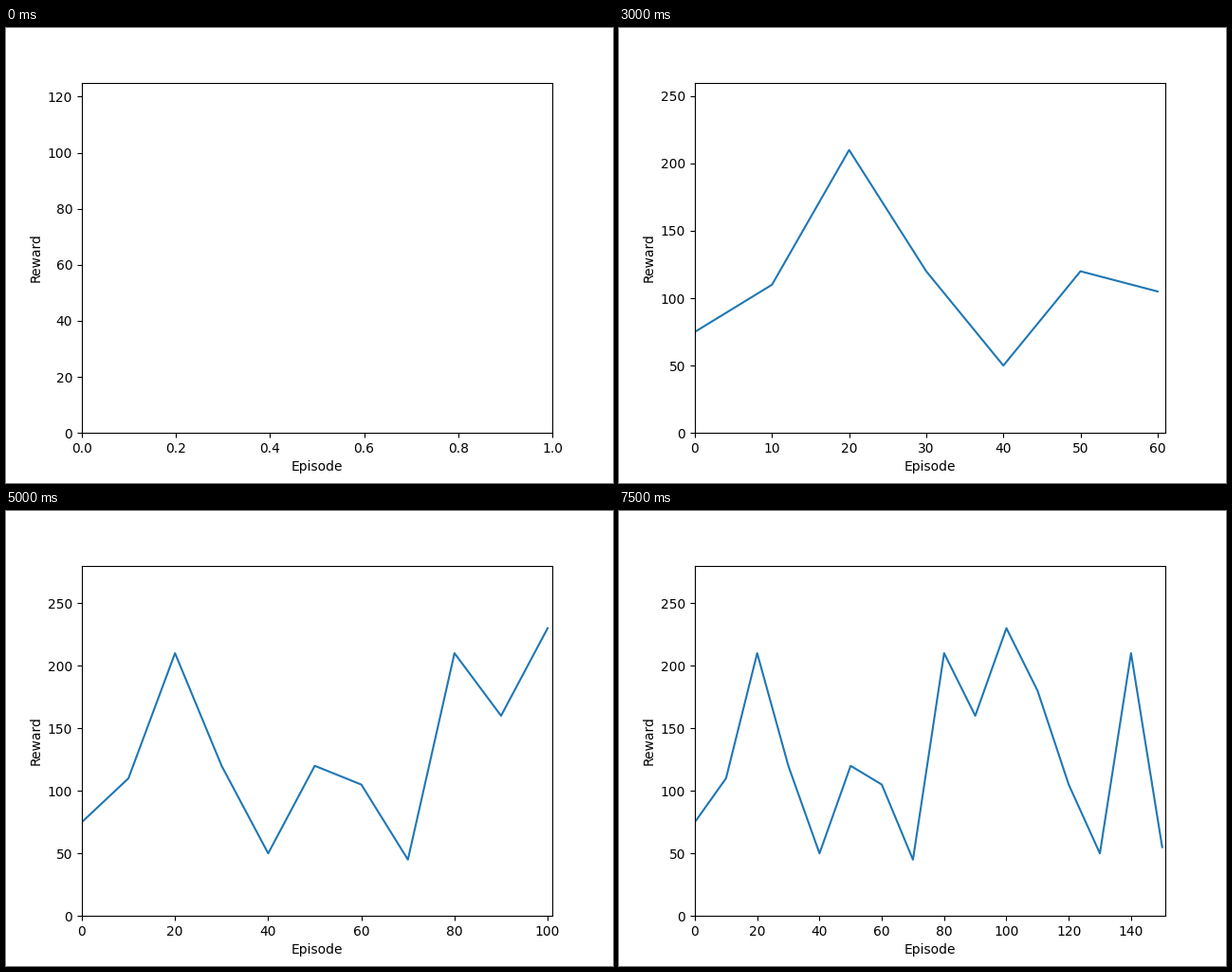
A matplotlib script that plays this animation: 640x480 px, repeating every 8000 ms.

```python
import matplotlib.pyplot as plt
from matplotlib.animation import FuncAnimation

STEP = 10        # episodes between evaluations
HEADROOM = 50    # space kept above the best reward
REWARDS = [75, 110, 210, 120, 50, 120, 105, 45,
           210, 160, 230, 180, 105, 50, 210, 55]
EPISODES = [STEP * i for i in range(len(REWARDS))]

fig, ax = plt.subplots(figsize=(6.4, 4.8), dpi=100)
ax.set_xlabel("Episode")
ax.set_ylabel("Reward")
line, = ax.plot([], [], color="tab:blue", lw=1.5)


def update(i):
    episodes, rewards = EPISODES[:i + 1], REWARDS[:i + 1]
    line.set_data(episodes, rewards)
    ax.set_xlim(0, episodes[-1] + 1)
    ax.set_ylim(0, max(rewards) + HEADROOM)
    return line,


anim = FuncAnimation(fig, update, frames=len(REWARDS), interval=500,
                     init_func=lambda: update(0), repeat=True, repeat_delay=0)
plt.show()
```
